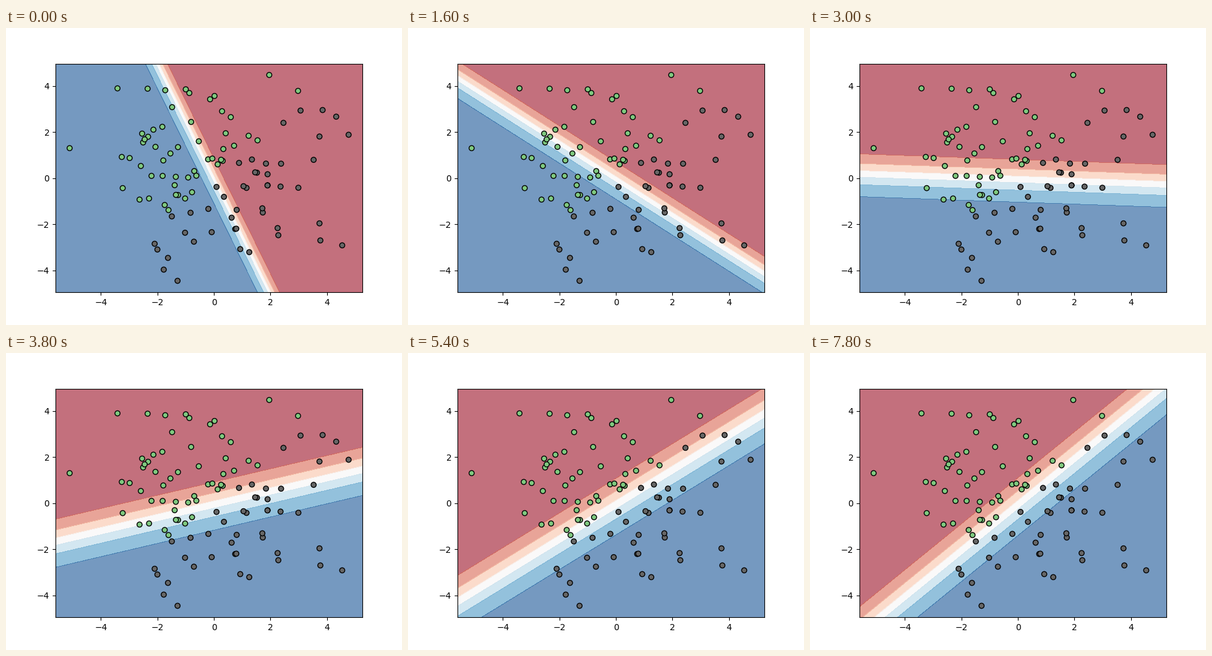
A matplotlib script that plays this animation: 640 px wide and 480 px high, repeating every 8000 ms.

```python
import numpy as np
import matplotlib.pyplot as plt
from matplotlib.animation import FuncAnimation

FRAMES, INTERVAL = 40, 200
RATE = 0.3
START = (-5.0, -2.0)
STEP, PAD = 0.02, 0.5
LEVELS = np.arange(8) * 0.15


def sigmoid(z):
    return 1 / (1 + np.exp(-z))


def descend(points, labels):
    """Weights of a logistic model after each gradient step."""
    w = np.array(START)
    path = [w]
    for _ in range(FRAMES - 1):
        error = sigmoid(points @ w) - labels
        w = w - RATE * points.T @ error / len(points)
        path.append(w)
    return path


rng = np.random.RandomState(0)
points = 2 * rng.randn(100, 2)
labels = (points[:, 0] > points[:, 1]).astype(int)
path = descend(points, labels)

low, high = points.min(axis=0) - PAD, points.max(axis=0) + PAD
gx, gy = (np.arange(a, b, STEP) for a, b in zip(low, high))
xx, yy = np.meshgrid(gx, gy)

fig, ax = plt.subplots(figsize=(6.4, 4.8), dpi=100)
ax.scatter(*points.T, c=labels, cmap="Accent", edgecolors="k", zorder=2)
ax.set(xlim=(gx[0], gx[-1]), ylim=(gy[0], gy[-1]))

surface = None


def update(step):
    global surface
    if surface is not None:
        surface.remove()
    w1, w2 = path[step]
    surface = ax.contourf(xx, yy, sigmoid(w1 * xx + w2 * yy), LEVELS,
                          cmap="RdBu", alpha=0.6)
    return []


anim = FuncAnimation(fig, update, frames=FRAMES, interval=INTERVAL,
                     repeat=True, repeat_delay=0)
plt.show()
```
